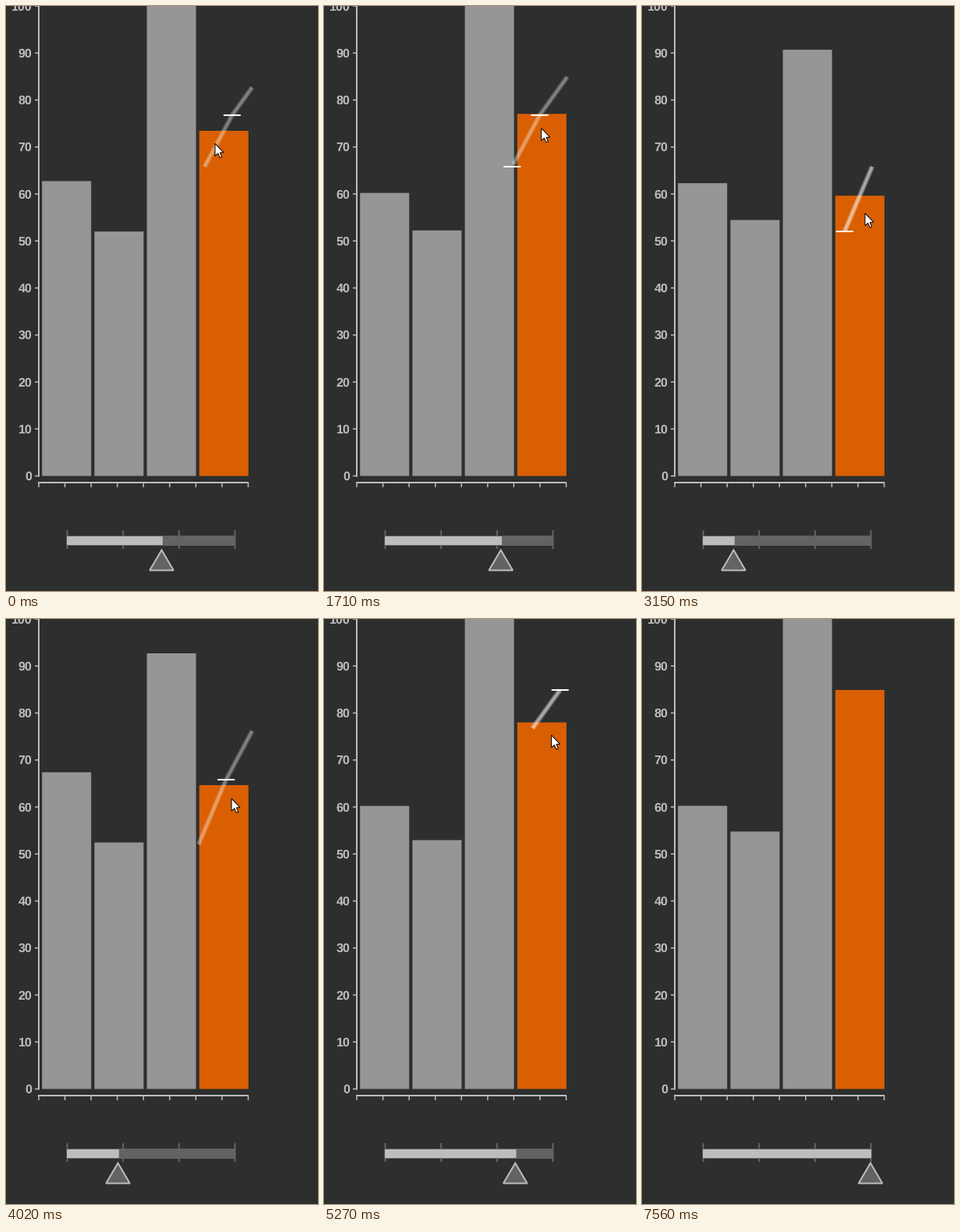
Animation of 400 by 750 pixels, one loop 7.77 s. Source, as a matplotlib script:

```python
import numpy as np
import matplotlib.pyplot as plt
from matplotlib.animation import FuncAnimation
from matplotlib.patches import Polygon, Rectangle

plt.rcParams.update({"path.snap": False, "text.hinting": "no_hinting"})

W, H, LOOP, TICK = 400, 750, 7770, 30
PX = 0.72  # points per pixel at 100 dpi
BG, GREY, DIM, LIGHT, ORANGE = "#2d2f2e", "#969696", "#636363", "#bdbdbd", "#d95f02"
BASE, UNIT = 602.5, 60.25
HOLD = 143  # ms between refreshes; motion is timed in these steps
RELEASE, GONE = 47, 53

# Bar tops at the four time points; the last bar is the dragged one.
TOPS = np.array([
    [273.6, 189.4, 239.7, 239.5],
    [256.0, 289.3, 289.0, 272.5],
    [74.4, 41.2, -28.0, -60.0],
    [289.0, 206.0, 140.0, 91.0],
])
DRAG = TOPS[3]
POINTS = np.arange(4)
MID, GAP = 279.2, 35.3  # dragged bar's centre, hint path spacing

# Dragged height: key steps joined by a smooth curve, flat where it turns.
KEY = np.array([0, 6.6, 12, 16, 22, 24, 28, 33, 41, 44, 47])
TOP = np.array([160, 112, 138.3, 170, 243.2, 261, 213, 161, 98, 92, 91])
SLOPE = np.gradient(TOP, KEY)
rise = np.diff(TOP)
SLOPE[1:-1][rise[1:] * rise[:-1] <= 0] = 0


def drag_y(k):
    """Cubic Hermite curve through the key steps."""
    k = min(k, KEY[-1])
    i = min(np.searchsorted(KEY, k, side="right"), len(KEY) - 1) - 1
    d = KEY[i + 1] - KEY[i]
    x = (k - KEY[i]) / d
    return (TOP[i] * (1 + 2 * x) * (1 - x) ** 2 + TOP[i + 1] * x * x * (3 - 2 * x)
            + d * x * (1 - x) * (SLOPE[i] * (1 - x) - SLOPE[i + 1] * x))


def pointer(k, y):
    if k < RELEASE:
        x = 268 + 24 * np.sin(np.pi / 2 * min(k / 41, 1))
        return x, y + 16.3 + 8 * np.exp(-((k - 19) / 6) ** 2)
    q = min((k - RELEASE + 0.5) / 6, 1)
    return 292 + 100 * q ** 1.5, 110 + 640 * q * q * (3 - 2 * q)


fig = plt.figure(figsize=(W / 100, H / 100), dpi=100, facecolor=BG)
ax = fig.add_axes([0, 0, 1, 1])
ax.set(xlim=(0, W), ylim=(H, 0))
ax.axis("off")


def line(xs, ys, color=LIGHT, width=2, **kw):
    return ax.plot(xs, ys, color=color, lw=width * PX, solid_capstyle="butt", **kw)[0]


def box(x, y, w, h, color, z):
    return ax.add_patch(Rectangle((x, y), w, h, fc=color, ec="none", zorder=z))


# Axes
line([42, 42], [0, 603.5])
for v in range(0, 101, 10):
    y = BASE - UNIT * v / 10
    line([37, 42], [y, y], width=1.5)
    ax.text(33.5, y + 5.5, str(v), color=LIGHT, size=16 * PX, weight="bold",
            family="Liberation Sans", ha="right", va="baseline")
line([41, 311], [611, 611])
for x in np.linspace(42, 310.5, 9):
    line([x, x], [611, 617], width=1.5)

# Bars
bars = [box(46.2 + 67.2 * i, 0, 63, 1, ORANGE if i == 3 else GREY, 3)
        for i in POINTS]

# Slider
SX, SW = 78.5, 71.67
for x in SX + SW * POINTS:
    line([x, x], [672, 696], DIM, zorder=2)
box(78, 679, 216, 13, DIM, 3)
fill = box(78, 680, 1, 11, LIGHT, 4)
KNOB = np.array([(0, 697.5), (15.3, 723.5), (-15.3, 723.5)])
knob = ax.add_patch(Polygon(KNOB, fc=DIM, ec=LIGHT, lw=2 * PX, zorder=5))

# Hint path, its dashes and the pointer
glow = [line([], [], "white", w, zorder=6) for w in (6.5, 4.5, 2.5)]
dashes = [line([], [], "white", zorder=7) for _ in POINTS]
ARROW = np.array([(0, 0), (0, 16), (3.7, 12.6), (6.3, 18.2), (8.8, 17.2),
                  (6.3, 11.7), (11, 11.5)])
arrow = ax.add_patch(Polygon(ARROW, fc="white", ec="black", lw=PX, zorder=9))


def hint_path(u, rising, shown):
    """Show the current segment plus one step ahead in the drag direction."""
    seg = min(int(u), 2)
    lo, hi = (seg, min(u + 1.03, 3)) if rising else (max(u - 1.03, 0), seg + 1)
    s = np.unique([lo, *POINTS[(POINTS > lo) & (POINTS < hi)], hi])
    for g in glow:
        g.set_data(MID + (s - u) * GAP, np.interp(s, POINTS, DRAG))
        g.set_alpha(0.26 if hi - lo <= 1 else 0.16)
        g.set_visible(shown)
    for i, d in enumerate(dashes):
        x = MID + (i - u) * GAP
        ahead = x - MID if rising else MID - x
        d.set_data([x - 11, x + 11], [DRAG[i]] * 2)
        d.set_visible(bool(shown and -4 < ahead < 38))


def draw(n):
    k = (n * TICK + 20) // HOLD
    y = drag_y(k)
    s = np.interp(-y, -DRAG, POINTS)
    u = s if s <= 2 else min(3, 2 + 2.2 * (s - 2))  # slider leads the last stretch

    for bar, tops in zip(bars, TOPS):
        top = y if bar is bars[3] else np.interp(u, POINTS, tops)
        bar.set_y(top)
        bar.set_height(BASE - top)

    x = SX + SW * u - 0.6
    fill.set_width(min(x + 1.3, 294) - 78)
    knob.set_xy(KNOB + (x, 0))

    hint_path(u, drag_y(k + 0.01) < y, k < RELEASE)
    arrow.set_xy(ARROW + pointer(k, y))
    arrow.set_visible(k < GONE)
    return [*bars, fill, knob, *glow, *dashes, arrow]


anim = FuncAnimation(fig, draw, frames=LOOP // TICK, interval=TICK,
                     repeat=True, repeat_delay=0, blit=False)
plt.show()
```
